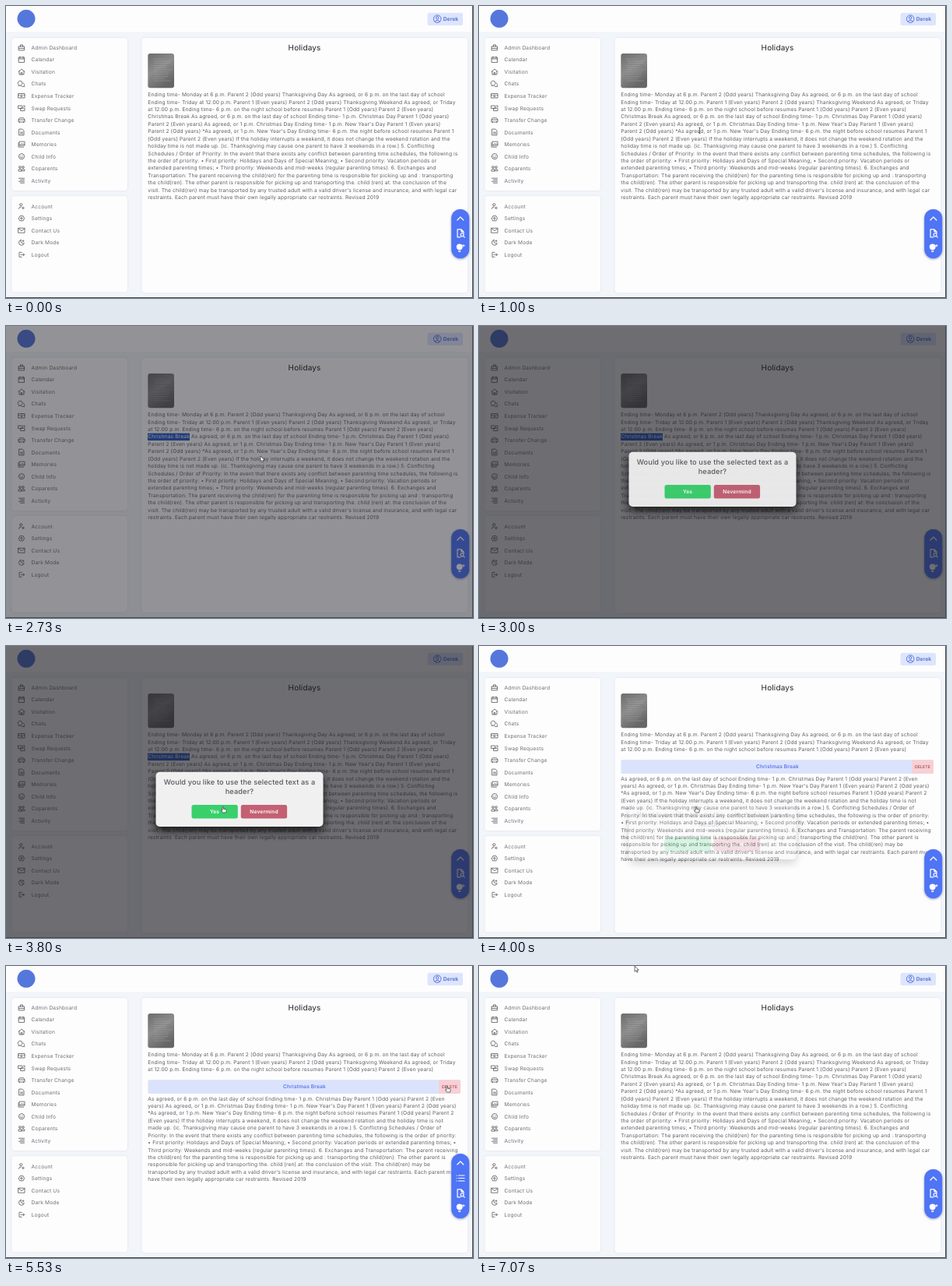
Write an HTML page that moves like this. It is 600 by 375 pixels and loops after 7340 ms.

```html
<!DOCTYPE html>
<html lang="en">
<head>
<meta charset="utf-8">
<title>Holidays</title>
<style>
  html, body { margin: 0; width: 100%; height: 100%; overflow: hidden; background: #f2f5f9; }
  svg { display: block; width: 100%; height: 100%; }
  text { font-family: Inter, sans-serif; font-size: 6.67px; letter-spacing: .127px; text-rendering: geometricPrecision; white-space: pre; }
  .menu text { fill: #707073; letter-spacing: .16px; }
  .icon { fill: none; stroke: #606064; stroke-width: .85; stroke-linejoin: round; stroke-linecap: round; }
  .copy text { fill: #606064; }
  .card { fill: #fdfdfe; filter: drop-shadow(0 0 1px rgba(60, 80, 110, .13)); }
  .mid { text-anchor: middle; }
  .bold { font-weight: 600; }
  .pill { fill: none; stroke: #fff; stroke-width: 1.2; stroke-linejoin: round; stroke-linecap: round; }
  .modal { filter: drop-shadow(0 5px 6px rgba(0, 0, 0, .85)); }
</style>
</head>
<body>
<svg id="stage" viewBox="0 0 600 375" preserveAspectRatio="none"></svg>
<script>
const LOOP = 7340, PITCH = 9.43, TOP = 116.1;

const intro = [
  'Ending time- Monday at 6 p.m. Parent 2 (Odd years) Thanksgiving Day As agreed, or 6 p.m. on the last day of school',
  'Ending time- Triday at 12:00 p.m. Parent 1 (Even years) Parent 2 (Odd years) Thanksgiving Weekend As agreed, or Triday',
  'at 12:00 p.m. Ending time- 6 p.m. on the night school before resumes Parent 1 (Odd years) Parent 2 (Even years)'
];
// "|" breaks the plain layout, "~" the layout with a header bar
const rest = "As agreed, or 6 p.m. on the last day of school Ending time- 1 p.m. Christmas Day Parent 1 (Odd years)|" +
  "Parent 2 (Even~years) As agreed, or 1 p.m. Christmas Day Ending time- 1 p.m. New Year's Day Parent 1 (Even years)|" +
  "Parent 2 (Odd years)~*As agreed, or 1 p.m. New Year's Day Ending time- 6 p.m. the night before school resumes Parent 1|" +
  "(Odd years) Parent 2~(Even years) If the holiday interrupts a weekend, it does not change the weekend rotation and the|" +
  "holiday time is not~made up. (ic. Thanksgiving may cause one parent to have 3 weekends in a row.) 5. Conflicting|" +
  "Schedules / Order of~Priority: In the event that there exists any conflict between parenting time schedules, the following is|" +
  "the order of priority:~• First priority: Holidays and Days of Special Meaning; • Second priority: Vacation periods or|" +
  "extended parenting times; •~Third priority: Weekends and mid-weeks (regular parenting times). 6. Exchanges and|" +
  "Transportation: The parent receiving~the child(ren) for the parenting time is responsible for picking up and : transporting|" +
  "the child(ren). The other parent is~responsible for picking up and transporting the. child (ren) at: the conclusion of the|" +
  "visit. The child(ren) may be~transported by any trusted adult with a valid driver's license and insurance, and with legal car|" +
  "restraints. Each parent must~have their own legally appropriate car restraints. Revised 2019";

const menu = [
  ['Admin Dashboard', 'M-3.5-1.5h7v5h-7zM-1.5-1.5v-2h3v2M-3.5 1h7'],
  ['Calendar', 'M-3.5-3h7v6.5h-7zM-3.5-1h7M-2-4v2M2-4v2'],
  ['Visitation', 'M-4 0L0-3.5 4 0M-3-1v4.5h6V-1M-.8 3.5v-2.5h1.6v2.5'],
  ['Chats', 'M-3.5 1.5a2.9 2.9 0 1 1 1.8 .5l-2 .5zM2.3-1a2.4 2.4 0 0 1 1 3.6l.5 1-1.6-.2a2.6 2.6 0 0 1-3-.9'],
  ['Expense Tracker', 'M-4-3h8v5.5h-8zM-1.3-.2a1.3 1.3 0 1 0 2.6 0a1.3 1.3 0 1 0-2.6 0M-4-1h1M3-1h1'],
  ['Swap Requests', 'M-4-3h5v3.5h-5zM-1 0h5v3.5h-5zM2.5-3h1.5v1.5'],
  ['Transfer Change', 'M-4 2v-2.5l1.5-2.3h5l1.5 2.3v2.5zM-4-.5h8M-2.5 2v1M2.5 2v1'],
  ['Documents', 'M-3-4h4l2 2v5.8h-6zM-1.5 0h3M-1.5 1.8h3'],
  ['Memories', 'M-2.5-3.5h6.5v5h-6.5zM-4-2v5.5h6.5M-2 1l2-2 1.3 1.2 1-1 1.4 1.4'],
  ['Child Info', 'M-3.6 0a3.6 3.6 0 1 0 7.2 0a3.6 3.6 0 1 0-7.2 0M-1.5 1.2q1.5 1.2 3 0M-1.2-.7v.1M1.2-.7v.1'],
  ['Coparents', 'M-3.3-1.7a1.3 1.3 0 1 0 2.6 0a1.3 1.3 0 1 0-2.6 0M.7-1.7a1.3 1.3 0 1 0 2.6 0a1.3 1.3 0 1 0-2.6 0M-4 3v-1.5q2-1.6 4 0v1.5zM0 3h4v-1.5q-2-1.6-4 0'],
  ['Activity', 'M-3.5-3h7M-1.5-1h5M-3.5 1h7M-1.5 3h5']
];
const account = [
  ['Account', 'M-2.3-2a1.6 1.6 0 1 0 3.2 0a1.6 1.6 0 1 0-3.2 0M-3.5 3.2q0-3 3-2.5M1 2.2a1.1 1.1 0 1 0 2.2 0a1.1 1.1 0 1 0-2.2 0'],
  ['Settings', 'M-3.6 0l1.6-3.1h4l1.6 3.1-1.6 3.1h-4zM-1.2 0a1.2 1.2 0 1 0 2.4 0a1.2 1.2 0 1 0-2.4 0'],
  ['Contact Us', 'M-4-3h8v6h-8zM-4-2.5l4 3 4-3'],
  ['Dark Mode', 'M-.8-3.4a3.5 3.5 0 1 0 4.2 4.3a3.2 3.2 0 0 1-4.2-4.3M2-3v2M1-2h2'],
  ['Logout', 'M0-3h-3v6h3M-1 0h4.5M2-1.6l1.6 1.6-1.6 1.6']
];

const rect = (x, y, w, h, r, attrs) => `<rect x="${x}" y="${y}" width="${w}" height="${h}" rx="${r}" ${attrs}/>`;
const label = (x, y, s, attrs = '') => `<text x="${x}" y="${y}" ${attrs}>${s}</text>`;
const lines = (list, y) => list.map((s, i) => label(182.3, y + i * PITCH, s)).join('');
const path = (x, y, d, cls) => `<path class="${cls}" transform="translate(${x} ${y})" d="${d}"/>`;
const items = (list, y) => list.map(([name, d], i) =>
  path(20, y + i * 15.53, d, 'icon') + label(32.5, y + 2.5 + i * 15.53, name)).join('');
const split = (mark, other) => rest.split(other).join(' ').split(mark);

const plain = split('|', '~');
plain[0] = 'Christmas Break ' + plain[0];
const afterIntro = TOP + 3 * PITCH;

const photoLines = Array.from({ length: 11 }, (_, i) =>
  `<path d="M${189 + i % 3} ${68 + i * 2.8}h${15 + (i * 7) % 9}" stroke="#b4b4b4" stroke-width=".6" opacity=".55"/>`).join('');

document.getElementById('stage').innerHTML = `
  <defs>
    <linearGradient id="photo" x2=".5" y2="1">
      <stop stop-color="#6c6c6c"/><stop offset=".5" stop-color="#8c8c8c"/><stop offset="1" stop-color="#666"/>
    </linearGradient>
    <clipPath id="marked">${rect(236, 137.7, 0, 9.4, 0, 'class="mark"')}</clipPath>
  </defs>
  <rect width="600" height="375" fill="#f2f5f9"/>
  <rect width="600" height="33" fill="#fdfdfe"/>
  <circle cx="26" cy="16.3" r="11.5" fill="#5577dc"/>
  ${rect(541.5, 8.7, 45.5, 16.3, 2.5, 'fill="#dde5fc"')}
  <g fill="none" stroke="#4d68da" stroke-width=".9">
    <circle cx="554.2" cy="16.6" r="4.8"/><circle cx="554.2" cy="15.2" r="1.7"/><path d="M551 20q3.2-3.2 6.4 0"/>
  </g>
  ${label(561.7, 19, 'Derek', 'class="bold" fill="#4d68da"')}
  ${rect(7.5, 41, 148.5, 196, 4, 'class="card"')}
  ${rect(7.5, 244, 148.5, 123.5, 4, 'class="card"')}
  ${rect(174.5, 41, 418.5, 327, 4, 'class="card"')}
  <g class="menu">${items(menu, 53.4)}${items(account, 257.2)}</g>
  ${label(383.5, 57.3, 'Holidays', 'class="mid" fill="#222224" style="font-size:10px"')}
  ${rect(182.3, 61, 33.7, 44.3, 3, 'fill="url(#photo)"')}${photoLines}
  <g class="copy">
    ${lines(intro, TOP)}
    <g id="plain">${lines(plain, afterIntro)}
      ${rect(236, 137.7, 0, 9.4, 0, 'class="mark" fill="#2b5bc7"')}
      <g clip-path="url(#marked)">${label(182.3, afterIntro, 'Christmas Break', 'style="fill:#fff"')}</g>
    </g>
    <g id="headed">
      ${rect(182.3, 146.3, 401.7, 17.6, 2, 'fill="#dbe3fc"')}
      <path d="M556 146.3h26q2 0 2 2v13.6q0 2-2 2h-26z" fill="#f7d0d5"/>
      ${label(383.5, 157.4, 'Christmas Break', 'class="mid bold" style="fill:#5877ea"')}
      ${label(570, 157, 'DELETE', 'class="mid" style="fill:#9a4550;font-size:5.2px;font-weight:500"')}
      ${lines(split('~', '|'), 172.5)}
    </g>
  </g>
  <g style="filter:drop-shadow(0 1px 1.5px rgba(40,60,130,.5))">${rect(572.2, 261, 23, 63, 11.5, 'id="pill" fill="#4f74f6"')}</g>
  <path id="chevron" class="pill" d="M579.8 2l4-4 4 4"/>
  <g id="list">${path(584, 272.5, 'M-5-3.5h.2M-2.5-3.5h7.5M-5 0h.2M-2.5 0h7.5M-5 3.5h.2M-2.5 3.5h7.5', 'pill')}</g>
  ${path(584, 291.8, 'M0 5h-4v-10h5l3 3v2M1-5v3h3M0 2a2 2 0 1 0 4 0a2 2 0 1 0-4 0M3.5 3.5l1.8 1.8', 'pill')}
  <path transform="translate(582.7 311)" fill="#fff" d="M-1.7 2.2q-2.3-1.5-2.3-3.6a4 4 0 0 1 8 0q0 2.1-2.3 3.6zM-1.5 3.2h3v1.2q-1.5 1.4-3 0zM4.7-5h.9v1.3h1.3v.9h-1.3v1.3h-.9v-1.3h-1.3v-.9h1.3z"/>
  <rect id="shade" width="600" height="375" fill="#17171d"/>
  <g id="modal" class="modal">
    ${rect(192.5, 161.7, 215, 70.3, 5, 'fill="#f0f0f1"')}
    <g class="mid" fill="#58585b">
      ${label(300, 178.2, 'Would you like to use the selected text as a', 'style="font-size:9.2px;font-weight:500"')}
      ${label(300, 190.4, 'header?', 'style="font-size:9.2px;font-weight:500"')}
    </g>
    ${rect(238.5, 204, 59.3, 17.4, 2.5, 'fill="#39d06c"')}
    ${rect(301.8, 204, 59.3, 17.4, 2.5, 'fill="#c46072"')}
    <g class="mid bold" fill="#fff">${label(268, 215, 'Yes')}${label(331.5, 215, 'Nevermind')}</g>
  </g>
  <path id="cursor" stroke-width=".7" stroke-linejoin="round"/>
  <path d="M0 374.5h599.5V0" fill="none" stroke="#48484b"/>`;

const el = id => document.getElementById(id);
const [plainText, headed, pill, chevron, list, shade, modal, cursor] =
  ['plain', 'headed', 'pill', 'chevron', 'list', 'shade', 'modal', 'cursor'].map(el);
const marks = document.querySelectorAll('.mark');

const shapes = {
  arrow: ['M0 0v7.2l1.7-1.5 1.2 2.6 1.2-.6-1.2-2.5h2.3z', '#fff', '#333'],
  beam: ['M-1.2-3.5h2.4M0-3.5v7M-1.2 3.5h2.4', 'none', '#333'],
  hand: ['M-1-3.5q.8-.9 1.5 0v2.7l3 .7q.9.3.7 1.3l-.6 2.8h-4.1l-2.2-2.8q.2-.9 1.7 0z', '#fff', '#333']
};
const cursorKinds = [[0, 'arrow'], [150, 'beam'], [2600, 'arrow'], [3250, 'hand'], [4070, 'arrow'], [5420, 'hand'], [6480, 'arrow']];

const tracks = {
  cursor: [[70, 600, 300], [270, 430, 215], [730, 430, 215], [1130, 236, 142], [1270, 236, 142], [1800, 183, 142],
    [2270, 183, 142], [2730, 327, 167], [3070, 300, 203], [3350, 279, 210], [4100, 279, 210],
    [4870, 470, 180], [5130, 470, 180], [5530, 567, 158], [6470, 567, 158], [7070, 200, 0]],
  drag: [[1270, 0], [1780, 1]],
  shade: [[2530, 0], [2730, .46], [2930, .62], [3800, .62], [3990, 0]],
  modal: [[2735, 0, -30], [3000, .94, 0], [3070, 1, 0], [3800, 1, 0], [4000, .19, 42], [4070, 0, 52]],
  grow: [[4070, 0], [4400, 1], [6329, 1], [6330, 0]]
};

function sample(track, t) {
  const next = track.findIndex(k => k[0] > t);
  if (next === 0) return track[0].slice(1);
  if (next < 0) return track[track.length - 1].slice(1);
  const a = track[next - 1], b = track[next];
  const p = (t - a[0]) / (b[0] - a[0]), e = p * p * (3 - 2 * p);
  return a.slice(1).map((v, i) => v + (b[i + 1] - v) * e);
}
const show = (node, on) => node.setAttribute('visibility', on ? 'visible' : 'hidden');

function draw(t) {
  const hasHeader = t >= 3870 && t < 6330;
  show(plainText, !hasHeader);
  show(headed, hasHeader);

  const width = t < 3870 ? 54 * Math.ceil(sample(tracks.drag, t)[0] * 15) / 15 : 0;
  marks.forEach(m => { m.setAttribute('x', 236 - width); m.setAttribute('width', width); });

  const [grow] = sample(tracks.grow, t);
  pill.setAttribute('y', 261 - 20 * grow);
  pill.setAttribute('height', 63 + 20 * grow);
  chevron.setAttribute('transform', `translate(0 ${273 - 20 * grow})`);
  list.setAttribute('opacity', Math.max(0, 2 * grow - 1));

  shade.setAttribute('opacity', sample(tracks.shade, t)[0]);
  const [alpha, dy] = sample(tracks.modal, t);
  modal.setAttribute('opacity', alpha);
  modal.setAttribute('transform', `translate(0 ${dy})`);

  const [x, y] = sample(tracks.cursor, t);
  const [d, fill, stroke] = shapes[cursorKinds.filter(k => k[0] <= t).pop()[1]];
  cursor.setAttribute('d', d);
  cursor.setAttribute('fill', fill);
  cursor.setAttribute('stroke', stroke);
  cursor.setAttribute('transform', `translate(${x} ${y})`);
  show(cursor, t >= 70 && (t < 2880 || t > 3070));
}

const start = performance.now();
function tick() {
  draw((performance.now() - start) % LOOP);
  requestAnimationFrame(tick);
}
tick();
</script>
</body>
</html>
```
